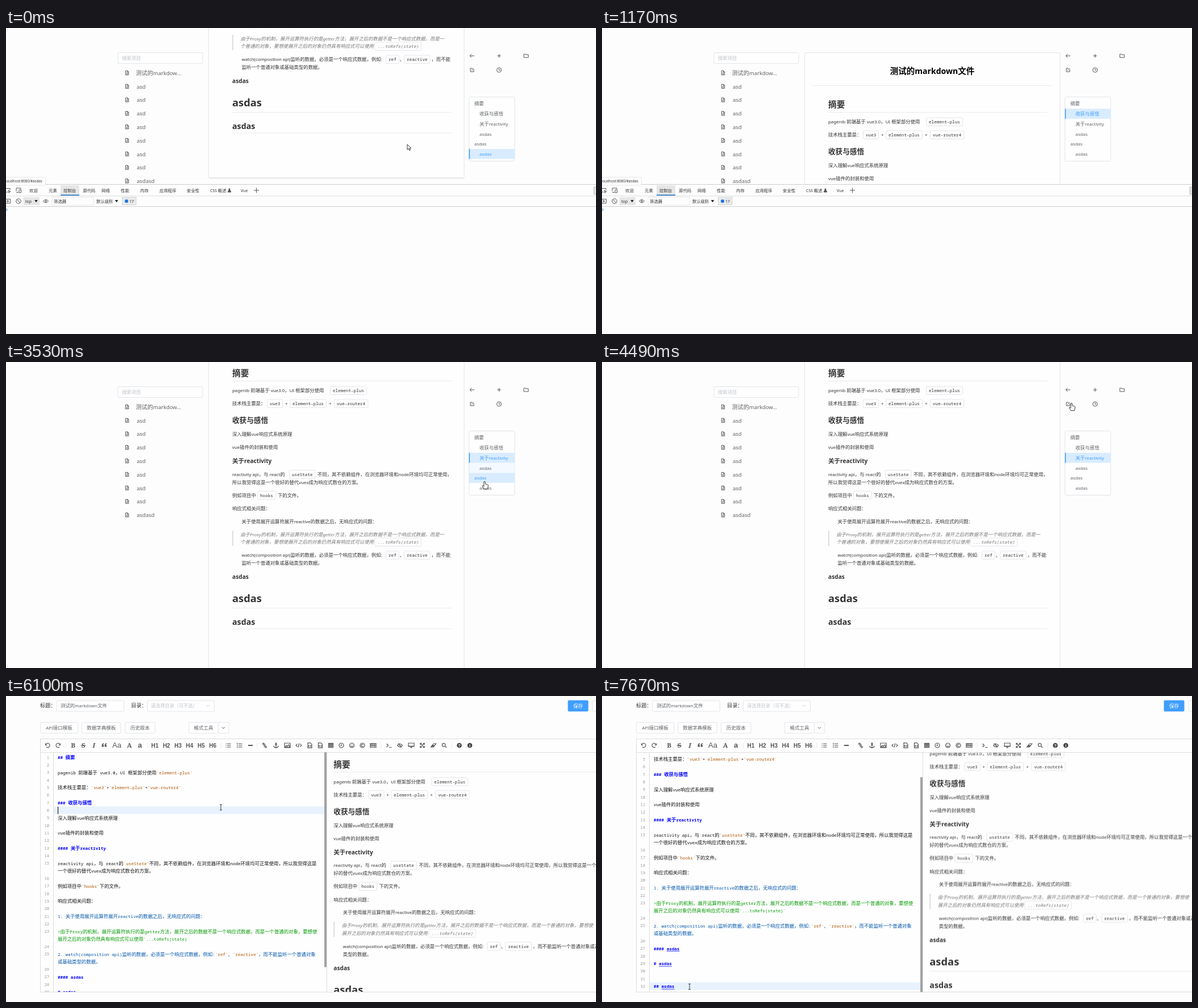
An HTML page that plays this animation: 1038x539 px, repeating every 8000 ms.

```html
<!DOCTYPE html>
<html lang="zh-CN">
<head>
<meta charset="utf-8">
<title>Markdown</title>
<style>
  html, body { margin: 0; width: 100%; height: 100%; overflow: hidden; background: #fdfdfd; }
  svg { display: block; }
  text { font-family: "Noto Sans", "Noto Sans CJK SC", sans-serif; fill: #333; }
  .mono { font-family: "Noto Sans Mono", "Noto Sans CJK SC", monospace; }
  .bold { font-weight: 700; }
  .title { font-weight: 700; fill: #000; text-anchor: middle; }
  .quote { font-style: italic; fill: #777; }
  .soft { fill: #606266; }
  .hint { fill: #c0c4cc; }
  .link { fill: #409eff; }
  .save { fill: #fff; }
  .number { fill: #999; }
  .end { text-anchor: end; }
  .mid { text-anchor: middle; }
  .tool { font: 700 10px "Liberation Sans", sans-serif; fill: #555; text-anchor: middle; }
  .serif { font: 700 11.5px "Noto Serif", serif; }
  .slant { font-style: italic; }
  .large { font-size: 13px; }
  .thin { font-weight: 400; }
  .badge { font-size: 7.5px; fill: #fff; }
  .box { fill: #fefefe; stroke: #dcdfe6; stroke-width: .8; }
  .line { fill: none; stroke: #444; stroke-width: .9; }
  .rule { fill: none; stroke: #e9e9e9; stroke-width: 1; }
  .edge { fill: none; stroke: #ddd; stroke-width: 1; }
</style>
</head>
<body>
<svg id="stage" width="1038" height="539" viewBox="0 0 1038 539"></svg>
<script>
const LOOP = 8000, ROW = 13.33, TOC_ROW = 17.7;

// Commas become full-width; Latin runs are set a little smaller than the Chinese around them.
const mix = (s, ratio) => s.replace(/,/g, '\uff0c')
  .replace(/[ -~]+/g, run => `<tspan font-size="${ratio}em">${run}</tspan>`);

const text = (x, y, s, size = 8.4, cls = '', ratio = /bold|title/.test(cls) ? .97 : .94) =>
  `<text x="${x}" y="${y + size * .37}" font-size="${size}" class="${cls}">${mix(s, ratio)}</text>`;

const rect = (x, y, w, h, attrs = 'class="box" rx="2"') =>
  `<rect x="${x}" y="${y}" width="${w}" height="${h}" ${attrs}/>`;

const path = (d, cls = 'line', extra = '') => `<path d="${d}" class="${cls}" ${extra}/>`;

const icon = (x, y, d, extra = '') => path(d, 'line', `transform="translate(${x} ${y})" ${extra}`);

const group = (id, body) => `<g id="${id}">${body}</g>`;

const pane = (x, y, w, h, body) =>
  `<svg x="${x}" y="${y}" width="${w}" height="${h}" viewBox="${x} ${y} ${w} ${h}">${body}</svg>`;

const code = (x, y, s, cls = '') =>
  rect(x + .5, y - 7, s.length * 4.58 + 9, 14.4) + text(x + 5, y, s, 8.4, 'mono ' + cls, .908);

const circle = r => `M${-r} 0a${r} ${r} 0 1 0 ${2 * r} 0a${r} ${r} 0 1 0 ${-2 * r} 0`;

// ---------- the rendered document, narrow or wide ----------
function article(wide) {
  const rule = y => path(`M398 ${y}H${wide ? 880 : 783}`, 'rule');
  const pick = (a, b) => wide ? a : b;
  return [
    text(398, 135, '摘要', 14.7, 'bold'), rule(148.5),
    text(398, 165, 'pagenib 前端基于 vue3.0,UI 框架部分使用'), code(570, 165, 'element-plus'),
    text(398, 188, '技术栈主要是\uff1a'), code(459, 188, 'vue3'), text(491, 188, '+'),
    code(499, 188, 'element-plus'), text(568, 188, '+'), code(577, 188, 'vue-router4'),
    text(398, 217.5, '收获与感悟', 12.6, 'bold'),
    text(398, 242, '深入理解vue响应式系统原理'),
    text(398, 265, 'vue插件的封装和使用'),
    text(398, 289.5, '关于reactivity', 10.5, 'bold'),
    text(398, 312.5, 'reactivity api,与 react的'), code(498, 312.5, 'useState'),
    text(548, 312.5, '不同,其不依赖组件,在浏览器环境和node环境均可正常使用,' + pick('所以我觉得这是一个很', '')),
    text(398, 326.5, pick('', '所以我觉得这是一个很') + '好的替代vuex成为响应式数仓的方案。'),
    text(398, 349.5, '例如项目中'), code(442, 349.5, 'hooks'), text(478, 349.5, '下的文件。'),
    text(398, 373, '响应式相关问题\uff1a'),
    text(414.5, 395.5, '关于使用展开运算符展开reactive的数据之后,无响应式的问题\uff1a'),
    rect(398, 412, 2, 27, 'fill="#ddd"'),
    text(412.5, 418.5, '由于Proxy的机制,展开运算符执行的是getter方法,展开之后的数据不是一个响应式数据,而是一' + pick('个普通的对象,要想使', ''), 8.4, 'quote'),
    text(412.5, 432, pick('', '个普通的对象,要想使') + '展开之后的对象仍然具有响应式可以使用', 8.4, 'quote'),
    code(pick(565, 648), 432, '...toRefs(state)', 'quote'),
    text(414.5, 455, 'watch(composition api)监听的数据,必须是一个响应式数据,例如:'),
    code(668, 455, 'ref'), text(692.5, 455, '、'), code(700, 455, 'reactive'),
    text(748.5, 455, ',而不能' + pick('监听一个普通对象或基础', '')),
    text(414.5, 469, pick('', '监听一个普通对象或基础') + '类型的数据。'),
    text(398, 493.5, 'asdas', 10.5, 'bold'),
    text(398, 531, 'asdas', 18.9, 'bold'), rule(548.5),
    text(398, 572.5, 'asdas', 14.7, 'bold'), rule(585)
  ].join('');
}

// ---------- reading page ----------
const FILE = 'M-2.7-3.6h3.6l1.8 1.8v5.4h-5.4zM.7-3.6v2h2M-1.2 0h2.6M-1.2 1.8h2.6';
const CLOCK = circle(4) + 'M0-2.4V.4H2';

const sidebar = () => rect(197, 43.5, 149, 19) + text(204, 53, '搜索项目', 8.4, 'hint') +
  ['测试的markdow...', ...Array(7).fill('asd'), 'asdasd'].map((name, i) => {
    const y = 79 + i * 23.8;
    return icon(213, y, FILE) + text(i ? 230 : 228.5, y, name, 10.1, 'soft');
  }).join('');

const TOC = ['摘要', '收获与感悟', '关于reactivity', 'asdas', 'asdas', 'asdas'];

const toc = () => rect(814.5, 121.5, 80.5, 113) +
  group('pale', rect(815, 177.4, 80, TOC_ROW, 'fill="#f3f9ff"')) +
  TOC.map((name, i) => {
    const top = 124.5 + i * TOC_ROW, x = i % 4 ? 833 : 824;
    return text(x, top + 8.8, name, 8.4, 'soft') +
      group('lit' + i, rect(815, top, 80, TOC_ROW, 'fill="#d9ecff"') + text(x, top + 8.8, name, 8.4, 'link'));
  }).join('') + group('bar', rect(814.5, 124.5, 1.6, TOC_ROW, 'fill="#409eff"'));

const reader = () => sidebar() +
  group('scroll', rect(356.5, 43.5, 449.5, 620.5) + path('M357 664.7H806', 'edge') +
    text(581, 76, '测试的markdown文件', 14.5, 'title') + path('M369 101.5H792', 'rule') + article(false)) +
  icon(820, 49, 'M4 0H-4l3.2-3.2M-4 0l3.2 3.2') + icon(867.5, 49, 'M-3.2 0h6.4M0-3.2v6.4') +
  icon(915, 49, 'M-4-3h3l1 1h4v5h-8z') + icon(820, 74, 'M1-3h-4v6h6v-4M-1 1l4-4') +
  icon(867.5, 74, CLOCK) + toc();

// ---------- developer tools ----------
const TABS = [[41, '欢迎'], [75, '元素'], [101, '控制台'], [135, '源代码'], [168, '网络'], [202, '性能'],
  [236, '内存'], [270, '应用程序'], [318, '安全性'], [359, 'CSS 概述'], [413, 'Vue']];
const DOWN = 'M-2.8-2h5.6L0 2.2z';
const SOLID = 'style="fill:#222;stroke:none"';

const devtools = () => rect(0, 275, 1038, 264, 'fill="#fdfdfd"') +
  path('M0 275.5H1038M0 314.5H1038', 'line', 'style="stroke:#c8c8c8"') + path('M0 295.8H1038', 'edge') +
  rect(96, 277, 33, 17, 'fill="#e6e6e6"') + rect(96, 293.6, 33, 1.6, 'fill="#1a73c8"') +
  TABS.map(([x, name]) => text(x, 286, name, 7.4)).join('') +
  icon(3, 286, 'M-5-3.5H4v3M-5 3H0M1 0l4 2-2 .6-.8 2z') +
  icon(22, 286, 'M-4 1.5V-4h8v2M-4 3.5H0M1-1h3.5v5H1z') +
  icon(393, 286, 'M-.8-3v2l-2 4h5.6l-2-4v-2z', 'style="fill:#555"') +
  icon(440.5, 286, 'M-4.5 0h9M0-4.5v9') + rect(1034, 280, 6, 13, 'fill="#e2e2e2" stroke="#bbb" stroke-width=".8"') +
  icon(4, 305, 'M-6-3.5H3.5v7H-6M-2-1.5L1 0l-3 1.5z') + icon(22, 305, circle(4.2) + 'M-3-3l6 6') +
  rect(31, 298, 28, 14, 'fill="#e6e6e6"') + text(34, 305, 'top', 7.4) + icon(53, 305, DOWN, SOLID) +
  icon(70, 305, 'M-4.5 0Q0-5.4 4.5 0Q0 5.4-4.5 0' + circle(1.2)) +
  rect(81, 298, 73, 14, 'class="rule"') + text(84, 305, '筛选器', 7.4) + text(159, 305, '默认级别', 7.2) +
  icon(194.5, 305, DOWN, SOLID) +
  rect(204.5, 298, 24.5, 13.5, 'fill="#eaeaea" stroke="#ccc" stroke-width=".8"') +
  '<circle cx="212" cy="305" r="3" fill="#1a73e8"/>' + text(217, 305, '17', 7.4) +
  path('M0 317.5l2.4 2.5L0 322.5', 'line', 'style="stroke:#1a73e8"');

const status = () => rect(-3, 263, 72.5, 14) + text(47, 269.3, 'localhost:8080/#', 6.6, 'end') +
  group('hashEnd', text(47, 269.3, 'asdas', 6.6)) + group('hashTop', text(47, 269.3, '收获', 6.6));

// ---------- editor page ----------
const CHEVRON = 'M-2.6-1.3L0 1.3l2.6-2.6';
const button = (x, w, label) => rect(x, 46.5, w, 19) + text(x + w / 2, 56, label, 8.5, 'soft mid');

const header = () => text(60, 17, '标题\uff1a', 9.2) + rect(89, 8, 118.5, 19) + text(96, 17, '测试的markdown文件', 8.4, 'soft') +
  text(220, 17, '目录\uff1a', 9.2) + rect(248.5, 8, 118, 19) + text(255, 17, '请选择目录\uff08可不选\uff09', 8.2, 'hint') +
  icon(355, 17, CHEVRON, 'style="stroke:#c0c4cc"') +
  rect(988.5, 7.5, 36, 19.8, 'rx="2" fill="#409eff"') + text(1006.5, 17.5, '保存', 8.6, 'mid save') +
  rect(1031.5, 8, 30, 19) + button(60.5, 66, 'API接口模板') + button(133.5, 68.5, '数据字典模板') +
  button(209.5, 52.5, '历史版本') + button(321.5, 52, '格式工具') + rect(373.5, 46.5, 18.5, 19) + icon(382.5, 56, CHEVRON);

const DOC_CODE = 'M-3.5-4.3h4.5l2.5 2.5v6.1h-7zM-.8-.6l-1.4 1.6 1.4 1.6M.8-.6l1.4 1.6L.8 2.6';
const RING = circle(4);
const TOOLS = [
  [73, 'M-3.5-3.5v3h3M-3.3-.8A3.7 3.7 0 1 1-2 2.8'], [92, 'M3.5-3.5v3h-3M3.3-.8A3.7 3.7 0 1 0 2 2.8'],
  [391, 'M-4.5-3h1.3M-4.5 0h1.3M-4.5 3h1.3M-2-3h6.5M-2 0h6.5M-2 3h6.5'],
  [411, 'M-4-4.3v2.6M-4-.8v1.6M-4 1.7v2.6M-2-3h6.5M-2 0h6.5M-2 3h6.5'], [430, 'M-4-.5h8M-4 .5h8'],
  [455, 'M-1-.5l-2.5-2.2 1.5-1.5L.8-1.5V.6M1 .5l2.5 2.2L2 4.2-.8 1.5V-.6'],
  [475, circle(1).replace('M-1 0', 'M-1-3.4') + 'M0-2.4v6.6M-2-.8h4M-4.3 1Q-3.5 4 0 4.2Q3.5 4 4.3 1'],
  [495, 'M-5-4H5v8H-5zM-4 3l2.5-3L0 1.5 2.5-1 4 1.5V3z'],
  [515, 'M-2.4-2.6L-5 0l2.6 2.6M2.4-2.6L5 0 2.4 2.6M.8-3.5l-1.6 7'], [534.5, DOC_CODE], [553, DOC_CODE],
  [571.5, 'M-4-3.7h8v7.4h-8zM-4-2.9h8M-4-.8h8M-4 1.4h8M-1.3-3v6.5M1.3-3v6.5'], [590, RING + 'M0-2.2V.4H-1.6'],
  [608.5, RING + 'M-1.5-1.4v.8M1.5-1.4v.8M-2 1Q0 3.2 2 1'], [627, RING + 'M1.7-1.2a2 2 0 1 0 0 2.4'],
  [646, 'M-5-3.5H5v7H-5zM-3.6-1.8h3v3h-3zM.6-1.8h3.2M.6-.2h3.2M.6 1.4h3.2'],
  [674, 'M-4.5-3L-1.5 0l-3 3M0 3.5h4.5'], [693, 'M-4.5 0Q0-5.5 4.5 0Q0 5.5-4.5 0M-1.4 0h2.8M-2.5-3.8l5 7.6'],
  [713, 'M-5-4H5v6H-5zM0 2v2M-2 4h4M-5 1.3H5'],
  [732.5, 'M-3.7-1v-2.7h2.7M3.7-1v-2.7H1M-3.7 1v2.7H-1M3.7 1v2.7H1M-3.5-3.5l7 7M3.5-3.5l-7 7'],
  [752, 'M-4.5 2.8L0-3h4.5L0 2.8zM-2.5.2h4.3M-3 1.3h4'], [771, 'M-3.6-.8a2.8 2.8 0 1 0 5.6 0a2.8 2.8 0 1 0-5.6 0M1.3 1.2L4 4']
];
const QUOTES = 'M-.8-3.4h-1.4q-2.2.4-2.2 3v3h3.4v-3.2h-1.6q0-1.4 1.8-1.4zM4.2-3.4H2.8q-2.2.4-2.2 3v3H4v-3.2H2.4q0-1.4 1.8-1.4z';
const LETTERS = [[118, 'B', 'serif'], [136, 'S', 'serif'], [154.5, 'I', 'serif slant'],
  [195, 'Aa', 'large thin'], [217, 'A', 'serif'], [235.5, 'a', 'large']];
const letter = (x, y, s, cls = '') => `<text x="${x}" y="${y}" class="tool ${cls}">${s}</text>`;

const toolbar = () => TOOLS.map(([x, d]) => icon(x, 87, d, 'style="stroke:#555;stroke-width:1.2"')).join('') +
  icon(173, 87, QUOTES, 'style="fill:#555;stroke:none"') +
  LETTERS.map(([x, s, cls]) => letter(x, 91, s, cls)).join('') + path('M131.5 87.3h9') +
  [1, 2, 3, 4, 5, 6].map(n => letter(241.6 + n * 20.35, 90.6, 'H' + n)).join('') +
  [[797.5, '?'], [816, 'i']].map(([x, s]) =>
    `<circle cx="${x}" cy="87" r="4.3" fill="#444"/>` + letter(x, 89.7, s, 'badge')).join('') +
  [105, 249, 378, 442, 660, 784].map(x => path(`M${x} 82v10`, 'rule')).join('');

// "|" marks a soft wrap inside a source line.
const SOURCE = `## 摘要

pagenib 前端基于 vue3.0,UI 框架部分使用\`element-plus\`

技术栈主要是\uff1a\`vue3\`+\`element-plus\`+\`vue-router4\`

### 收获与感悟

深入理解vue响应式系统原理

vue插件的封装和使用

#### 关于reactivity

reactivity api,与 react的\`useState\`不同,其不依赖组件,在浏览器环境和node环境均可正常使用,所以我觉得这是|一个很好的替代vuex成为响应式数仓的方案。

例如项目中\`hooks\`下的文件。

响应式相关问题\uff1a

1. 关于使用展开运算符展开reactive的数据之后,无响应式的问题\uff1a

>由于Proxy的机制,展开运算符执行的是getter方法,展开之后的数据不是一个响应式数据,而是一个普通的对象,要想使|展开之后的对象仍然具有响应式可以使用\`...toRefs(state)\`

2. watch(composition api)监听的数据,必须是一个响应式数据,例如:\`ref\`、\`reactive\`,而不能监听一个普通对象|或基础类型的数据。

#### asdas

# asdas


## asdas`.split('\n');

const INK = { '#': '#00f', '>': '#090', '1': '#05a', '2': '#05a' };
const sourceRow = (y, s, ink) => {
  const spans = s.split('`').map((part, i) => i % 2
    ? `<tspan fill="${ink === '#090' ? ink : '#a50'}">${mix('`' + part + '`', .9)}</tspan>` : mix(part, .9)).join('');
  return `<text x="91" y="${y + 3.1}" font-size="8.4" class="mono${ink === '#00f' ? ' bold' : ''}" style="fill:${ink}">${spans}</text>`;
};

function source() {
  let y = 108, rows = '', marks = '';
  SOURCE.forEach((line, i) => {
    const ink = INK[line[0]] || '#111';
    rows += text(76, y, String(i + 1), 7.6, 'mono end number');
    const start = line.indexOf('asdas');
    if (start > 0) marks += path(`M${91 + start * 4.55} ${y + 5}h22.8`, 'line', 'style="stroke:#33f"');
    line.split('|').forEach(part => { rows += sourceRow(y, part, ink); y += ROW; });
  });
  return rows + group('marks', marks);
}

const editor = () => rect(60.5, 75.5, 990, 446, 'fill="#fefefe" stroke="#ddd"') + path('M60 99.5H1038', 'edge') + toolbar() +
  pane(61, 100, 499, 421, path('M83.5 99V522', 'edge') + group('sourceScroll',
    group('activeLine', rect(84, 101.3, 476, ROW, 'fill="#e8f2ff"')) + source() +
    group('caretA', rect(91, 195, 1, 13, 'fill="#000"')) + group('caretB', rect(128, 555, 1, 13, 'fill="#000"')))) +
  path('M564.5 100V521', 'edge') + group('thumb', rect(560, 99, 4, 378.5, 'fill="#a3a3a3"')) +
  pane(566, 100, 472, 421, group('previewScroll', `<g transform="translate(178.3 -14.4)">${article(true)}</g>`));

// ---------- pointer ----------
const OUTLINE = 'style="fill:#fff;stroke:#222"';
const pointer = () =>
  group('arrow', path('M0 0V9.4L2.2 7.4 3.8 10.8 5.4 10.1 3.8 6.8H6.8Z', 'line', OUTLINE)) +
  group('hand', path('M-1.2 1Q0-.8 1.2 1V4.8L5.3 6Q6.6 6.5 6.4 8L5.2 13.6H-.8L-4 9Q-4.2 7.2-2.7 7.8L-1.2 9.2Z', 'line', OUTLINE)) +
  group('beam', path('M-2-4.8h4M0-4.8v9.6M-2 4.8h4', 'line', OUTLINE));

document.getElementById('stage').innerHTML =
  group('reader', reader()) + group('devtools', devtools()) + group('status', status()) +
  group('header', header()) + group('editor', editor()) + group('pointer', pointer());

// ---------- motion: stepped tracks of [ms, value] ----------
function track(id, prop, steps) {
  const frames = steps.map(([ms, value]) => ({ offset: ms / LOOP, [prop]: value, easing: 'steps(1, end)' }));
  frames.push({ offset: 1, [prop]: steps[steps.length - 1][1] });
  document.getElementById(id).animate(frames, { duration: LOOP, iterations: Infinity });
}
const fade = (id, ...steps) => track(id, 'opacity', steps);
const slide = (id, ...steps) => track(id, 'transform', steps.map(([ms, y]) => [ms, `translate(0px, ${y}px)`]));

slide('scroll', [0, -400], [650, -350], [770, -200], [900, -60], [1030, 0],
  [2990, -6], [3110, -29], [3260, -85], [3380, -115]);
fade('reader', [0, 1], [4760, .6], [4880, .25], [5010, 0]);
fade('devtools', [0, 1], [1830, 0]);
fade('status', [0, 1], [1290, .7], [1410, .4], [1560, 0]);
fade('hashEnd', [0, 1], [270, 0], [900, 1]);
fade('hashTop', [0, 0], [270, 1], [900, 0]);

const LIT = [[0, [5]], [270, [5, 1]], [650, [1]], [2320, [1, 3]], [2560, [1, 2]], [2990, [2]], [3530, [2, 4]], [3800, [2]]];
TOC.forEach((_, i) => fade('lit' + i, ...LIT.map(([ms, rows]) => [ms, rows.includes(i) ? 1 : 0])));
slide('bar', [0, 5 * TOC_ROW], [650, TOC_ROW], [2990, 2 * TOC_ROW]);
fade('pale', [0, 0], [3530, 1], [3650, 0]);

fade('header', [0, 0], [5430, .4], [5580, .75], [5730, 1]);
fade('editor', [0, 0], [5730, 1]);
const WHEEL = [[0, 0], [6630, .36], [6750, .8], [6880, 1]];
[['sourceScroll', -50], ['previewScroll', -49.5], ['thumb', 44]].forEach(([id, span]) =>
  slide(id, ...WHEEL.map(([ms, part]) => [ms, part * span])));
slide('activeLine', [0, 0], [5980, 7 * ROW], [7150, 34 * ROW]);
fade('caretA', [0, 0], [5980, 1], [6630, 0]);
fade('caretB', [0, 0], [7150, 1], [7670, 0]);
fade('marks', [0, 0], [7150, 1]);

const MOVES = [
  [0, 706, 205, 'arrow'], [150, 765, 190, 'arrow'], [270, 828, 165, 'hand'], [390, 846, 150, 'hand'], [510, 852, 146, 'hand'],
  [770, 853, 150, 'hand'], [900, 885, 190, 'hand'], [1030, 972, 215, 'arrow'], [1170, 1100, 290, 'arrow'],
  [2080, 1026, 254, 'arrow'], [2200, 943, 220, 'arrow'], [2320, 891, 187, 'hand'], [2440, 869, 175, 'hand'],
  [2560, 855, 167, 'hand'], [2710, 857, 168, 'hand'], [3530, 842, 210, 'hand'], [3650, 841, 211, 'hand'],
  [3800, 836, 165, 'hand'], [3950, 838, 122, 'arrow'], [4070, 845, 88, 'arrow'], [4220, 842, 70, 'arrow'],
  [4340, 846, 72, 'arrow'], [4490, 826, 72, 'hand'], [4610, 821, 73, 'hand'], [5160, 700, 135, 'arrow'],
  [5280, 606, 189, 'arrow'], [5430, 601, 198, 'arrow'], [5580, 500, 293, 'arrow'], [5730, 430, 260, 'beam'],
  [5850, 385, 205, 'beam'], [5980, 378, 196, 'beam'], [6220, 368, 250, 'beam'], [6340, 358, 299, 'beam'],
  [6490, 353, 368, 'beam'], [7030, 240, 430, 'beam'], [7150, 175, 495, 'beam'], [7270, 156, 512, 'beam'], [7420, 154, 512, 'beam']
];
track('pointer', 'transform', MOVES.map(([ms, x, y]) => [ms, `translate(${x}px, ${y}px)`]));
['arrow', 'hand', 'beam'].forEach(shape => fade(shape, ...MOVES.map(m => [m[0], m[3] === shape ? 1 : 0])));
</script>
</body>
</html>
```
